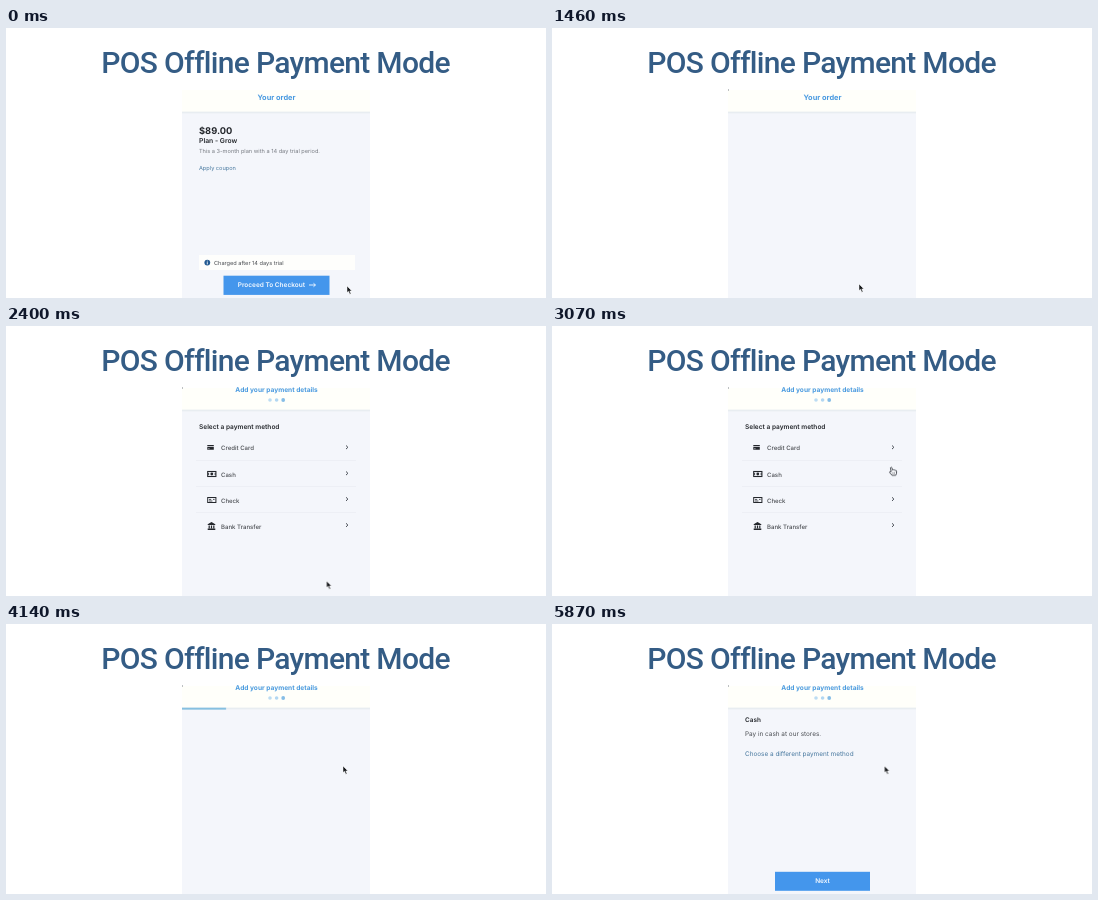
These frames come from a looping animation (540 by 270 pixels, 5.94 s). An HTML page:

```html
<!DOCTYPE html>
<html lang="en">
<head>
<meta charset="utf-8">
<title>Offline payment</title>
<style>
  html, body { margin: 0; width: 100%; height: 100%; overflow: hidden; background: #fff; }
  svg { display: block; width: 100vw; height: 100vh; }

  text { font-family: Inter, "Liberation Sans", sans-serif; font-size: 6.05px; fill: #4a4d52; text-rendering: geometricPrecision; }
  .title { font: 500 30px Roboto, "Open Sans", sans-serif; letter-spacing: -.7px; fill: #345c85; text-rendering: auto; }
  .mid { text-anchor: middle; }
  .head { font-weight: 700; fill: #4a9ae0; }
  .bold { font-weight: 600; fill: #24272c; }
  .row { font-weight: 500; }
  .small { font-size: 5.62px; }
  .body { font-size: 6.4px; }
  .link { fill: #47789f; }
  .btn { fill: #4496ec; }
  .cta { font-size: 6.5px; font-weight: 600; fill: #f4f9ff; }
  .rule { stroke: #ebeef4; stroke-width: .8; }
  .chev { fill: none; stroke: #454a52; stroke-width: 1; }
  .ink { fill: #24272c; }
  .line { fill: none; stroke: #24272c; stroke-width: 1.1; }

  .anim { animation: 5940ms linear infinite; }
  .hard { animation-timing-function: step-end; }

  #order { animation-name: order; }
  #orderHead { animation-name: orderHead; }
  #payHead { animation-name: payHead; }
  #list { animation-name: list; }
  #cash { animation-name: cash; }
  #bar { animation-name: bar; transform-origin: 176px 0; }
  #speck { animation-name: speck; }
  #pointer { animation-name: move; }
  #arrow { animation-name: arrow; }
  #hand { animation-name: hand; }

  @keyframes order { 0%, 23.5% { opacity: 1 } 24.5%, 100% { opacity: 0 } }
  @keyframes orderHead { 0% { opacity: 1 } 30.3%, 100% { opacity: 0 } }
  @keyframes payHead { 0% { opacity: 0 } 30.3%, 100% { opacity: 1 } }
  @keyframes list {
    0%, 30.2% { opacity: 0 }
    32.5% { opacity: .73 }
    38.5%, 65.1% { opacity: 1 }
    66.4%, 100% { opacity: 0 }
  }
  @keyframes cash {
    0%, 74.6% { opacity: 0 }
    77.5% { opacity: .73 }
    83.1%, 100% { opacity: 1 }
  }
  @keyframes bar {
    0%, 66% { transform: scaleX(0); opacity: 1 }
    69.6% { transform: scaleX(1); opacity: 1 }
    71.5% { transform: scaleX(1.25); opacity: 1 }
    73%, 100% { transform: scaleX(1.4); opacity: 0 }
  }
  @keyframes speck { 0% { opacity: 0 } 17.8%, 100% { opacity: 1 } }
  @keyframes move {
    0%, 10% { transform: translate(341px, 258px); animation-timing-function: ease-in-out }
    16%, 30.3% { transform: translate(307px, 256px); animation-timing-function: ease-in-out }
    39.4%, 40.4% { transform: translate(320.5px, 255px); animation-timing-function: ease-in-out }
    49.5%, 50.5% { transform: translate(340px, 148px) }
    51.6%, 52.8% { transform: translate(339px, 141.2px) }
    55.5% { transform: translate(338.5px, 136px) }
    59.6%, 98.75% { transform: translate(337px, 142px) }
    98.8%, 100% { transform: translate(332.5px, 142px) }
  }
  @keyframes arrow {
    0% { opacity: 1 }
    13.8% { opacity: 0 }
    24.2% { opacity: 1 }
    44.5% { opacity: 0 }
    65.7%, 100% { opacity: 1 }
  }
  @keyframes hand {
    0% { opacity: 0 }
    13.8% { opacity: 1 }
    24.2% { opacity: 0 }
    44.5% { opacity: 1 }
    65.7%, 100% { opacity: 0 }
  }
</style>
</head>
<body>
<svg viewBox="0 0 540 270" preserveAspectRatio="none">
  <defs>
    <path id="chevron" class="chev" d="M-1 -1.8L.9 0L-1 1.8"/>
  </defs>
  <rect width="540" height="270" fill="#fff"/>
  <text class="title mid" x="269.6" y="45">POS Offline Payment Mode</text>

  <rect x="176" y="62" width="188" height="208" fill="#f4f6fb"/>
  <rect x="176" y="62" width="188" height="22" fill="#fffffa"/>
  <rect x="176" y="83.6" width="188" height="1.8" fill="#e8edf1"/>
  <rect id="speck" class="anim hard" x="176" y="61.5" width="1" height="1" fill="#7d8287"/>
  <rect id="bar" class="anim" x="176" y="83.6" width="43.5" height="2" fill="#86c0e0"/>

  <text id="orderHead" class="anim hard head mid" x="270.5" y="72.1" style="font-size:7.4px">Your order</text>
  <g id="payHead" class="anim hard">
    <text class="head mid" x="270.6" y="66.4" style="font-size:6.6px">Add your payment details</text>
    <circle cx="264" cy="74" r="1.8" fill="#bcdcf3"/>
    <circle cx="270.6" cy="74" r="1.8" fill="#b2d7f2"/>
    <circle cx="277.2" cy="74" r="1.9" fill="#86bde6"/>
  </g>

  <g id="order" class="anim">
    <text class="bold" x="193" y="105.7" style="font-size:9.3px;font-weight:700">$89.00</text>
    <text class="bold" x="193" y="114.7" style="font-size:6.8px">Plan - Grow</text>
    <text class="small" x="193" y="124.7" style="fill:#777b82">This a 3-month plan with a 14 day trial period.</text>
    <text class="small link" x="193" y="141.6">Apply coupon</text>
    <rect x="193" y="227" width="156" height="15" fill="#fefefc"/>
    <circle cx="201.3" cy="234.6" r="2.9" fill="#235a92"/>
    <path d="M201.3 232.7v.8M201.3 234.2v2.2" stroke="#fff" stroke-width=".9"/>
    <text class="small" x="208" y="236.6">Charged after 14 days trial</text>
    <rect class="btn" x="217.5" y="247.7" width="106" height="19.2"/>
    <text class="cta" x="231.7" y="259.3">Proceed To Checkout</text>
    <path d="M303 257H309.3M307.5 255.3L309.5 257L307.5 258.7" fill="none" stroke="#f4f9ff" stroke-width=".9"/>
  </g>

  <g id="list" class="anim">
    <text class="bold" x="193" y="103.3" style="font-size:6.55px">Select a payment method</text>
    <path class="rule" d="M190 134.5H350M190 160.5H350M190 186.5H350"/>
    <text class="row" x="215" y="124.4">Credit Card</text>
    <text class="row" x="215" y="150.6">Cash</text>
    <text class="row" x="215" y="176.5">Check</text>
    <text class="row" x="215" y="202.6">Bank Transfer</text>
    <use href="#chevron" x="341" y="121.3"/>
    <use href="#chevron" x="341" y="147.3"/>
    <use href="#chevron" x="341" y="173.1"/>
    <use href="#chevron" x="341" y="199.1"/>

    <path class="ink" d="M201.3 119h6.5v1.2h-6.5zM201.3 120.9h6.5v2.8h-6.5z"/>
    <path d="M202.1 122.7h1.5" stroke="#f4f6fb" stroke-width=".6"/>
    <rect class="line" x="201.7" y="145.5" width="8.2" height="5"/>
    <circle class="ink" cx="205.8" cy="148" r="1.4"/>
    <path class="ink" d="M202 147.2h1.1v1.6h-1.1zM208.6 147.2h1.1v1.6h-1.1z"/>
    <rect class="line" x="201.7" y="171.5" width="8.2" height="5" style="stroke-width:1"/>
    <path class="line" d="M203 173.4h2.2M203 175h3.4M207 173.4h1.6" style="stroke-width:.8"/>
    <path class="ink" d="M205.5 196l3.8 2.2v.9h-7.6v-.9zM202.6 199.6h1.2v2.6h-1.2zM204.9 199.6h1.2v2.6h-1.2zM207.2 199.6h1.2v2.6h-1.2zM201.7 202.6h7.6v1.4h-7.6z"/>
  </g>

  <g id="cash" class="anim">
    <text class="bold body" x="193" y="97.6">Cash</text>
    <text class="body" x="193" y="112.3">Pay in cash at our stores.</text>
    <text class="body link" x="193" y="132.1">Choose a different payment method</text>
    <rect class="btn" x="223" y="247.8" width="95" height="19"/>
    <text class="cta mid" x="270.5" y="259.4">Next</text>
  </g>

  <g id="pointer" class="anim">
    <path id="arrow" class="anim hard" d="M0 0V6.6L1.5 5.3L2.8 8.2L4 7.7L2.8 4.9H4.9Z" fill="#15171a" stroke="#fff" stroke-width=".5"/>
    <g id="hand" class="anim hard" stroke="#4b4f56" stroke-linejoin="round">
      <path d="M-.6 .6Q.3 -.5 1 .6L1.6 2.8Q2.5 2.2 3.1 2.9Q4 2.4 4.5 3.2Q5.5 3 5.6 4.1L5.5 6.4L4.7 8.1H1.1L-1.5 5.2Q-1.6 4 .2 4.4Z" fill="#f6f7fa" stroke-width="1"/>
      <path d="M1.9 5v1.8M3.4 5v1.8" stroke-width=".5"/>
    </g>
  </g>
</svg>
</body>
</html>
```
